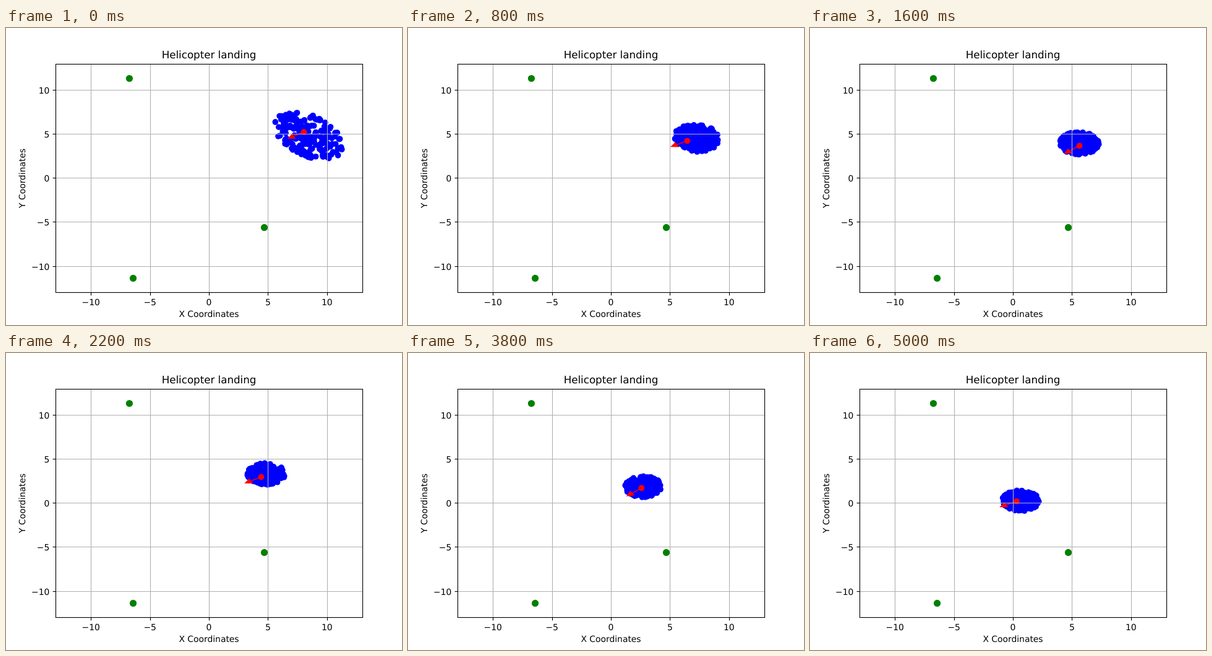
These frames come from a looping animation (640x480 px, 5200 ms). An HTML page:

```html
<!DOCTYPE html>
<html lang="en">
<head>
<meta charset="utf-8">
<title>Helicopter landing</title>
<style>
  html, body { margin: 0; width: 100%; height: 100%; overflow: hidden; background: #fff; }
  svg { display: block; width: 640px; height: 480px; }
  text {
    font: 13.89px "DejaVu Sans", sans-serif;
    text-anchor: middle;
    text-rendering: geometricPrecision;
  }
  .title { font-size: 16.67px; }
  .right { text-anchor: end; }
</style>
</head>
<body>
<svg viewBox="0 0 640 480">
  <rect width="640" height="480" fill="#fff"/>
  <g id="cloud" fill="#00f"></g>
  <g id="marks" fill="#008000"></g>
  <g id="craft" fill="#f00" stroke="#f00" stroke-width="1.39"></g>
  <g id="axes" fill="none" stroke-width="1.11"></g>
  <g id="labels"></g>
</svg>
<script>
const $ = id => document.getElementById(id);
const STEP = 200, STEPS = 26, PARTICLES = 200;
const SX = 496 / 26, SY = 369.6 / 26;   // pixels per data unit
const px = x => 328 + x * SX;
const py = y => 242.4 - y * SY;
const snap = v => Math.floor(v + 0.5) + 0.5;
const mix = (a, b, f) => a + (b - a) * f;

const dot = (x, y, r = 4.86) =>
  `<circle cx="${x.toFixed(2)}" cy="${y.toFixed(2)}" r="${r}"/>`;
const line = (x1, y1, x2, y2, color) =>
  `<path d="M${x1} ${y1}L${x2} ${y2}" stroke="${color}"/>`;
const label = (x, y, s, cls = '', extra = '') =>
  `<text x="${x}" y="${y}" class="${cls}" ${extra}>${s}</text>`;

function drawAxes() {
  let grid = '', ticks = '', text = '';
  for (let v = -10; v <= 10; v += 5) {
    const x = snap(px(v)), y = snap(py(v)), s = String(v).replace('-', '\u2212');
    grid += line(x, 58, x, 427.5, '#b0b0b0') + line(80, y, 576, y, '#b0b0b0');
    ticks += line(x, 427.5, x, 432.4, '#000') + line(75.6, y, 80.5, y, '#000');
    text += label(px(v).toFixed(2), 448, s) + label(70.3, y + 5, s, 'right');
  }
  $('axes').innerHTML = grid + ticks +
    '<rect x="80.5" y="58.5" width="496" height="369" stroke="#000"/>';
  $('labels').innerHTML = text +
    label(328, 49, 'Helicopter landing', 'title') +
    label(328, 467, 'X Coordinates') +
    label(0, 0, 'Y Coordinates', '', 'transform="translate(31 242.8) rotate(-90)"');
  $('marks').innerHTML = [[-6.74, 11.32], [4.69, -5.63], [-6.42, -11.4]]
    .map(([x, y]) => dot(px(x), py(y), 5.6)).join('');
}

// Key points of the flight: step, craft x and y, heading in degrees, cloud x and y.
const flight = [
  [0, 481.4, 168, 29, 489, 174],
  [4, 451.4, 182.5, 25.5, 468, 178],
  [8, 435.4, 190.4, 35, 435.5, 186.5],
  [11, 412.4, 200.4, 27, 420.5, 195.5],
  [15, 399.4, 206.4, 36, 398, 207],
  [19, 377.4, 218.2, 36, 380, 216],
  [25, 334, 239.6, 24.5, 340, 239]
];

function pose(k) {
  const i = Math.max(1, flight.findIndex(p => p[0] >= k));
  const a = flight[i - 1], b = flight[i];
  const f = (k - a[0]) / (b[0] - a[0]);
  return a.map((v, j) => mix(v, b[j], f));
}

function random(seed) {
  let s = seed;
  return () => {
    s = (s + 0x6d2b79f5) | 0;
    let t = Math.imul(s ^ (s >>> 15), s | 1);
    t ^= t + Math.imul(t ^ (t >>> 7), t | 61);
    return ((t ^ (t >>> 14)) >>> 0) / 2 ** 32;
  };
}

// Particles fill a slanted ellipse that tightens as the filter settles.
function cloud(k, cx, cy) {
  const rand = random(k + 1), loose = Math.exp(-k / 3.25);
  const rx = 30 + 25 * loose, ry = 17 + 18 * loose, slant = 0.3 * loose;
  let out = '';
  for (let i = 0; i < PARTICLES; i++) {
    const a = rand() * 2 * Math.PI, r = Math.sqrt(rand());
    const dx = rx * r * Math.cos(a), dy = ry * r * Math.sin(a);
    out += dot(cx + dx, cy + dy + slant * dx);
  }
  return out;
}

// Arrow of one data unit plus a head half a unit long and wide.
function craft(x, y, heading) {
  const a = heading * Math.PI / 180, c = Math.cos(a), s = Math.sin(a);
  const at = (along, side) =>
    `${(x - (along * c - side * s) * SX).toFixed(2)} ${(y + (along * s + side * c) * SY).toFixed(2)}`;
  return `<path d="M${at(0, 0)}L${at(1, 0)}"/>` +
    `<path d="M${at(1.5, 0)}L${at(1, 0.25)}L${at(1, -0.25)}Z"/>` +
    dot(x, y, 4.17);
}

let shown = -1;
const start = performance.now();

function draw() {
  const k = Math.floor((performance.now() - start) / STEP) % STEPS;
  if (k !== shown) {
    const [, x, y, heading, cx, cy] = pose(k);
    $('cloud').innerHTML = cloud(k, cx, cy);
    $('craft').innerHTML = craft(x, y, heading);
    shown = k;
  }
  requestAnimationFrame(draw);
}

drawAxes();
draw();
</script>
</body>
</html>
```
